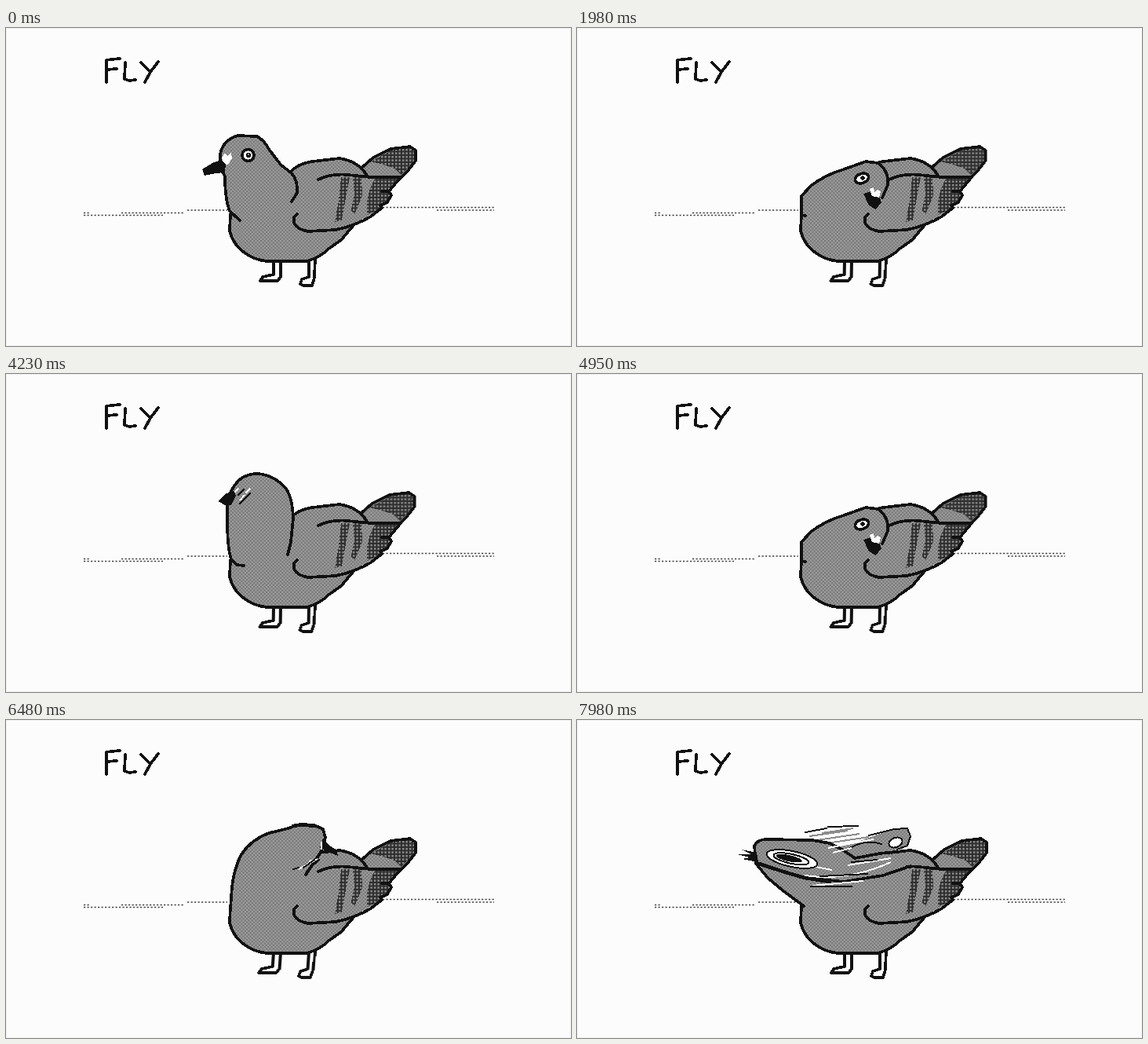
Animation of 720 by 405 pixels, one loop 8 s. Source, as an HTML page without scripts:

```html
<!DOCTYPE html>
<html lang="en">
<head>
<meta charset="utf-8">
<title>Pigeon</title>
<style>
html, body { margin: 0; width: 100%; height: 100%; overflow: hidden; background: #fcfcfc; }
svg { display: block; width: 100vw; height: 100vh; }
.ink { stroke: #111; stroke-width: 3.7; stroke-linejoin: round; stroke-linecap: round; fill: none; }
.grey { fill: url(#checker); }
.dark { fill: url(#mesh); }
.black { fill: #111; }
.white { fill: #fcfcfc; }
.thin { stroke-width: 2; }
.thick { stroke-width: 4.6; }
.pale { stroke: #fcfcfc; stroke-width: 2; fill: none; }
.mid { stroke: #8c8c8c; stroke-width: 2; fill: none; }
.ground { stroke: #444; stroke-width: 1.5; stroke-dasharray: 2.25; fill: none; }
.ground, pattern { shape-rendering: auto; }

/* line boil: three drawings per cycle, 22 cycles per loop */
.legs, .tail { animation: legs 363.636ms step-end infinite; }
.legs { transform-origin: 360px 296px; }
.tail { animation-name: tail; }
@keyframes legs {
  0%, 91% { transform: none; }
  31% { transform: skewX(-1deg); }
  72% { transform: skewX(-4deg); }
}
@keyframes tail {
  0%, 72% { transform: none; }
  31% { transform: translate(-1.5px, 0); }
}

/* one head pose shows at a time */
.pose { visibility: hidden; animation: 8s step-end infinite; }
.rest { animation-name: rest; }
.turn { animation-name: turn; }
.back { animation-name: back; }
.preen { animation-name: preen; }
.smear { animation-name: smear; }
.swing { animation-name: swing; }
@keyframes rest {
  0%, 30.375%, 70.875% { visibility: visible; }
  18%, 51.75%, 79.875% { visibility: hidden; }
}
@keyframes turn {
  0%, 19.125%, 54% { visibility: hidden; }
  18%, 51.75% { visibility: visible; }
}
@keyframes back {
  0%, 20.25%, 55.125%, 82.125% { visibility: hidden; }
  19.125%, 54%, 79.875% { visibility: visible; }
}
@keyframes preen {
  0%, 29.25%, 68.625%, 98.75% { visibility: hidden; }
  20.25%, 55.125%, 82.125% { visibility: visible; }
}
@keyframes smear {
  0%, 30.375%, 70.875% { visibility: hidden; }
  29.25%, 68.625% { visibility: visible; }
}
@keyframes swing {
  0% { visibility: hidden; }
  98.75% { visibility: visible; }
}

.bob { transform-origin: 300px 240px; animation: bob 8s step-end infinite; }
@keyframes bob {
  0%, 8%, 36%, 49% { transform: none; }
  6%, 7.5%, 34%, 47.5% { transform: skewX(4deg); }
  7%, 35%, 46.5% { transform: skewX(8deg); }
}
.nibble { animation: nibble 320ms step-end infinite; }
@keyframes nibble {
  0% { transform: none; }
  50% { transform: translate(1px, 3px); }
  75% { transform: translate(-1px, 1px); }
}
</style>
</head>
<body>
<svg viewBox="0 0 720 405" shape-rendering="crispEdges">
  <defs>
    <pattern id="checker" width="4.5" height="4.5" patternUnits="userSpaceOnUse">
      <path fill="#a0a0a0" d="M0 0h4.500v4.500H0z"/>
      <path fill="#767676" d="M0 0h2.250v2.250H0zM2.250 2.250h2.250v2.250H2.250z"/>
    </pattern>
    <pattern id="mesh" width="4.5" height="4.5" patternUnits="userSpaceOnUse">
      <path fill="#2e2e2e" d="M0 0h4.500v4.500H0z"/>
      <path fill="#a0a0a0" d="M1 1h2.250v2.250H1z"/>
    </pattern>
  </defs>

  <path fill="#fcfcfc" stroke="#f0f0f0" d="M.5 .5h719v404H.5z"/>

  <g class="ink" role="img" aria-label="FLY">
    <path d="M128 69V41L134 40 145 39M128 53L141 52"/>
    <path d="M152 44L151 65 157 67 165 66"/>
    <path d="M172 44L183 55M194 43L184 56 177 69"/>
  </g>

  <path class="ground" d="M99 235.5h9M147 235.5h80M99 238.5h101M231 232h51M480 228.5h142M549 232h73"/>

  <g class="legs ink">
    <path class="white" d="M341 296V314L327 317 324 322 346 322 350 317V296"/>
    <path class="white" d="M386 292V317L377 320 375 326 379 328 390 328 393 318 394 292"/>
  </g>

  <g class="tail">
    <path class="ink grey" d="M452 179L468 165 490 154 515 151 522 156 522 169 512 182 502 192 462 192"/>
    <path class="dark" d="M465 170L490 156 514 153 520 157 520 169 509 182 503 187 495 179 480 174Z"/>
  </g>

  <path class="grey" d="M285 236L363 184 378 173 400 168 427 166 445 172 460 188 503 190 488 209 478 230 443 250 425 270 405 287 385 297H328L305 288 292 276 286 260Z"/>
  <path class="ink" d="M286 237L285 258Q289 276 305 287 316 295 332 297H384Q402 291 410 282L427 270 444 250"/>
  <path class="ink" d="M362 184Q371 173 390 170L425 166Q450 170 460 188"/>

  <path class="dark" d="M427 190H438L433 216 428 245 419 247 424 220Z"/>
  <path class="dark" d="M442 190H453L454 214 444 238 440 232 444 212Z"/>
  <path class="dark" d="M470 192H502L488 208 491 214 478 230 460 238 460 220 464 204Z"/>
  <path class="ink" d="M398 193Q414 185 436 187L464 190H503L488 208 479 208M488 208L491 213 486 222 477 226M479 229L465 240Q445 252 420 257L385 259Q364 255 367 241L371 237"/>

  <g class="pose rest">
    <g class="bob">
      <path class="ink grey" d="M298 245L285 233Q279 218 279 189L273 178V161Q276 143 295 137L320 138Q330 144 334 153L350 174 364 185Q372 194 371 210L364 221"/>
      <path class="white" d="M275 165L279 159 282 163 287 159 288 166 283 174 277 173Z"/>
      <path class="black" d="M250 180L263 172 274 168 280 173 279 184 267 185 253 188Z"/>
      <circle class="ink white" cx="308.500" cy="162" r="7.500"/>
      <circle class="black" cx="309" cy="162" r="3.200"/>
      <circle fill="#888" cx="309" cy="161" r="1.300"/>
    </g>
  </g>

  <g class="pose turn">
    <path class="ink grey" d="M303 244L294 243 287 236Q281 220 282 166 284 148 297 135 307 127 320 127 341 128 357 146 365 158 366 184L363 214 359 230"/>
    <path class="black" d="M270 162L281 152 291 149 293 155 287 167 281 168Z"/>
    <path class="pale" d="M291 151L296 146M305 152L311 146M298 161L304 154"/>
    <path class="ink thin" d="M298 165L311 152M296 154L303 147"/>
  </g>

  <g class="pose back">
    <path class="ink grey" d="M286 240L288 212Q291 188 300 171 313 152 335 144L360 138 370 134 393 134 404 139 407 150 402 167 382 197"/>
    <path class="ink thick" d="M366 135L378 133 392 135"/>
    <path class="black" d="M404 150L412 160 421 165 423 173 413 169 400 163Z"/>
    <path class="pale" d="M402 165V155M373 190L397 177M384 184L389 178"/>
    <path class="ink thin" d="M366 190L373 188M379 188L393 178M383 193L399 178"/>
  </g>

  <g class="pose preen">
    <path class="ink grey" d="M291 239L286 238V214L298 201Q316 187 340 180L368 170 384 172Q398 183 396 200L389 216"/>
    <g class="nibble">
      <ellipse class="ink white" cx="363" cy="191.500" rx="9" ry="6" transform="rotate(-18 363 191.500)"/>
      <circle class="black" cx="364" cy="191" r="2.800"/>
      <path class="black" d="M365 211L374 208 386 216 388 222 381 231 372 226Z"/>
      <path class="white" d="M373 205L378 203 379 209 383 206 387 208 385 216 376 214Z"/>
    </g>
  </g>

  <g class="pose smear">
    <path class="ink grey" d="M364 181Q360 169 348 167L325 167Q302 169 287 184 274 192 275 211L284 232Q310 238 341 234 360 228 363 214"/>
    <path class="black" d="M276 200L305 200 288 206 276 207ZM270 221L305 213 348 208 340 214 300 220Z"/>
    <path class="pale" d="M277 212L318 207M318 200L335 196 361 197M305 209L347 207M277 223L300 220"/>
    <path class="ink thin" d="M247 211L282 214M252 219H285M266 185L276 187 284 185M302 211L340 205"/>
  </g>

  <g class="pose swing">
    <path class="grey" d="M318 160L350 158 380 147 402 139 421 137 425 148 421 161 404 166 392 180 350 190Z"/>
    <path class="mid" d="M296 148L345 141M306 153L360 145M318 157L372 149M312 144L352 138"/>
    <path class="ink thin" d="M291 143L318 138M320 136L358 135M372 147L404 139 421 138 425 148 421 160 408 165M340 168Q365 150 388 158"/>
    <ellipse class="ink thin white" cx="406" cy="156" rx="9" ry="6" transform="rotate(-22 406 156)"/>
    <path class="grey" d="M226 176V160L236 153 300 153 335 162 352 176 385 170 430 178 392 205 320 220 291 238 262 217 243 201Z"/>
    <path class="ink" d="M289 237L262 217 243 201 228 183 226 160Q230 152 242 152L300 153 322 157 338 165 354 176 386 170 425 166"/>
    <path class="ink thick" d="M232 183Q258 192 290 201L322 206"/>
    <path class="ink" d="M290 201L340 206 390 198 425 186"/>
    <path class="pale" d="M320 163L345 158 378 152M326 169L350 163M290 198Q345 206 400 181M300 211L365 205M345 185L400 176M304 187L325 191"/>
    <path class="ink thin" d="M298 212L350 212M350 181L382 178M310 199L370 196"/>
    <g transform="rotate(12 274 177)">
      <ellipse class="ink thin white" cx="274" cy="177" rx="33" ry="10"/>
      <ellipse class="ink thin white" cx="273" cy="177" rx="23" ry="6"/>
      <ellipse class="black" cx="270" cy="177" rx="17" ry="4"/>
    </g>
    <path class="black" d="M204 171L222 171 210 165 229 169 231 181 210 177 220 175Z"/>
  </g>
</svg>
</body>
</html>
```
